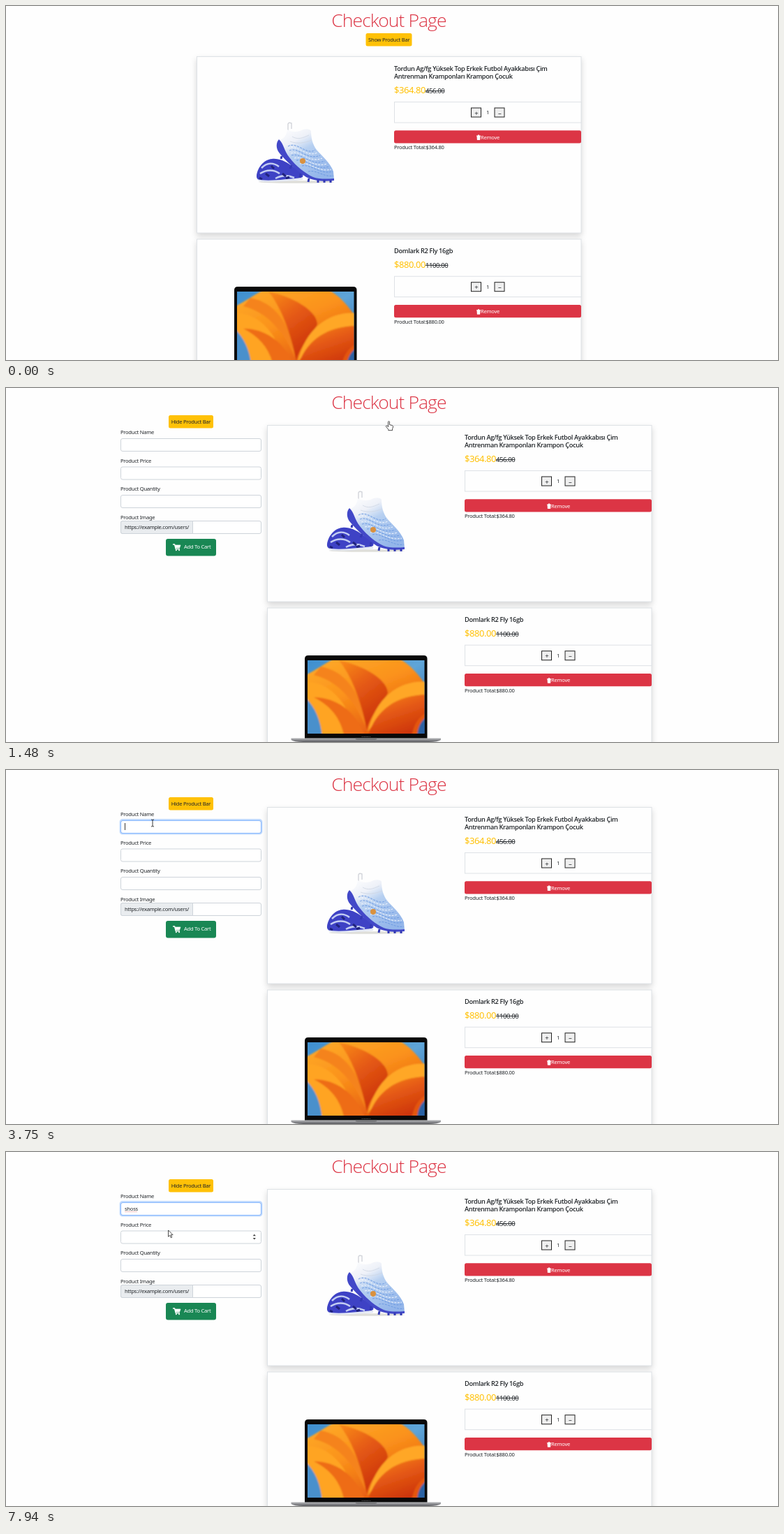
These frames come from a looping animation (1106x507 px, 8000 ms). An HTML page:

```html
<!DOCTYPE html>
<html lang="en">
<head>
<meta charset="utf-8">
<title>Checkout Page</title>
<style>
  html, body { margin: 0; width: 100%; height: 100%; overflow: hidden; background: #fefefe; }
  svg { display: block; width: 100vw; height: 100vh; }
  text { font: 7.6px "Noto Sans", "Open Sans", sans-serif; letter-spacing: -.035em; fill: #212529; white-space: pre; }
  .title { font: 300 26.5px "Open Sans", "Lato", sans-serif; fill: #dc3545; }
  .name { font: 600 9.2px "Open Sans", "Noto Sans", sans-serif; }
  .price { font-size: 13px; fill: #ffc107; }
  .old { font-size: 9.6px; fill: #212529; text-decoration: line-through; }
  .mid { text-anchor: middle; }
  .light { fill: #fff; }
  .sign { font-size: 9.5px; }
  .line { fill: #fefefe; stroke: #dee2e6; }
  .input { fill: #fff; stroke: #ced4da; }
  .card { fill: #fefefe; stroke: #dee2e6; filter: drop-shadow(0 4px 4px rgba(0, 0, 0, .16)); }
  .pointer { fill: #fff; stroke: #222; stroke-width: .8; stroke-linejoin: round; }
</style>
</head>
<body>
<svg id="stage" viewBox="0 0 1106 507">
  <defs>
    <linearGradient id="sky" x2="1" y2="1">
      <stop stop-color="#3f8fcf"/><stop offset=".5" stop-color="#5fa5d8"/><stop offset="1" stop-color="#2a62a4"/>
    </linearGradient>
    <linearGradient id="petal" x2=".6" y2="1">
      <stop stop-color="#ffb02c"/><stop offset=".5" stop-color="#fb921b"/><stop offset="1" stop-color="#e4560f"/>
    </linearGradient>
    <linearGradient id="ember" x2=".5" y2="1">
      <stop stop-color="#fa8c1b"/><stop offset=".45" stop-color="#e65c14"/><stop offset="1" stop-color="#cc330c"/>
    </linearGradient>
    <linearGradient id="knit" x2=".6" y2="1">
      <stop stop-color="#fff"/><stop offset=".3" stop-color="#eef1f8"/><stop offset=".5" stop-color="#b7d0f1"/><stop offset="1" stop-color="#94b6ea"/>
    </linearGradient>
    <linearGradient id="metal" x2="0" y2="1">
      <stop stop-color="#b9babd"/><stop offset=".5" stop-color="#8b8c90"/><stop offset="1" stop-color="#55565a"/>
    </linearGradient>
    <filter id="soft"><feGaussianBlur stdDeviation="1.2"/></filter>
    <clipPath id="screen"><rect x="331" y="409" width="167.5" height="105"/></clipPath>
  </defs>

  <text class="title mid" x="548.5" y="29.5">Checkout Page</text>

  <g id="open">
    <rect x="515.5" y="39" width="66" height="18.5" rx="2.5" fill="#ffc107"/>
    <text class="mid" x="548.7" y="51.2">Show Product Bar</text>
  </g>

  <g id="panel">
    <rect x="233" y="39" width="64" height="18.5" rx="2.5" fill="#ffc107"/>
    <text class="mid" x="265" y="51.2">Hide Product Bar</text>
    <g id="fields"></g>
    <path d="M164.5 193a2.5 2.5 0 0 1 2.5-2.5H267.5V208.5H167a2.5 2.5 0 0 1-2.5-2.5Z" fill="#e9ecef" stroke="#ced4da"/>
    <text x="170" y="202.3">https://example.com/users/</text>
    <rect x="229" y="216" width="72" height="24.5" rx="3" fill="#198754"/>
    <g fill="none" stroke="#fff" stroke-width="1.3">
      <path d="M239 224H241.5L243.2 230.5H249"/>
      <path d="M242 225H250L248.7 229H243Z" fill="#fff" stroke-width=".6"/>
      <path d="M243.8 232.3h.1M248 232.3h.1" stroke-width="2" stroke-linecap="round"/>
    </g>
    <text class="light" x="255" y="230.3">Add To Cart</text>
    <rect id="ring" x="163.5" y="71" width="203" height="20.5" rx="3.5" fill="none" stroke="#c2dbfe" stroke-width="2"/>
    <rect id="focus" x="164.5" y="72.5" width="201" height="18" rx="2.5" fill="none" stroke="#86b7fe"/>
    <text id="typed" x="170" y="84.3"></text>
    <path id="misspelt" d="M170.5 85.6H188.5" stroke="#e05252" stroke-width=".7" stroke-dasharray="1 1"/>
    <path id="caret" d="M0 76V86" stroke="#222" stroke-width=".9"/>
    <path id="spinner" d="M353.7 120.2L355.8 117.8L357.9 120.2ZM353.7 123L355.8 125.4L357.9 123Z" fill="#444"/>
  </g>

  <g id="cards">
    <rect class="card" x="273.5" y="72.5" width="550.5" height="252.5"/>
    <rect class="card" x="273.5" y="334" width="550.5" height="252.5"/>
    <g id="details"></g>

    <g id="boots">
      <ellipse cx="416" cy="252" rx="54" ry="1.8" fill="#deded9"/>
      <path d="M359 243C360 233 368 220 381 219C390 218 400 222 408 228L426 240L425 245C412 250 395 250 380 251C367 252 358 250 359 243Z" fill="#3e42c5"/>
      <path d="M366 232C374 224 383 224 391 230M364 240C373 234 384 234 392 240M386 247C395 242 404 242 413 246" fill="none" stroke="#c3cdf2" stroke-width="2.5"/>
      <path d="M363 246l4 2M372 240l5 4M380 229l4 4M396 240l5 4M401 247l5-2" stroke="#20237d" stroke-width="3"/>
      <path d="M359 248C374 252 400 248 425 246V249C400 251 374 253 363 251Z" fill="#e4e9f5"/>
      <path d="M404 178V169Q405 166 409 168V176" fill="none" stroke="#d2d4da" stroke-width="1.4"/>
      <path d="M403 177C408 180 414 181 421 179C429 175 435 176 437 179C437 189 439 198 445 206C452 214 465 225 469 237L470 249C460 251 447 249 437 245C421 236 409 221 396 211C389 205 387 197 392 192C399 190 402 184 403 177Z" fill="url(#knit)"/>
      <path d="M391 191C398 197 398 207 406 217C416 230 429 240 440 245C447 248 460 248 470 247V250C455 252 440 250 430 245C414 234 403 224 392 211C386 204 387 195 391 191Z" fill="#4248c8"/>
      <g fill="none" stroke="#6c9ae2" stroke-dasharray="3 1.5">
        <path d="M404 201C417 193 431 215 443 206M406 207C420 201 430 222 450 214M409 214C423 209 434 230 457 222M416 221C430 218 441 236 463 230M424 229C437 226 449 242 468 237M433 237C445 234 456 246 469 243"/>
        <path d="M404 204C417 197 431 218 446 210M408 211C422 205 433 226 453 218M413 218C428 213 439 233 460 226M421 226C435 222 447 239 466 234" stroke="#f3f7fd"/>
      </g>
      <path d="M410 187C418 192 425 189 434 185M407 194C418 198 428 196 438 192" fill="none" stroke="#cfd6e3" stroke-width=".8"/>
      <path d="M395 215l-1 4M409 228l-2 5M422 240l-1 6M434 247l-1 5M447 249v4M456 249v4M465 249v4" stroke="#3339b3" stroke-width="3"/>
      <circle cx="425" cy="222" r="4" fill="#d9913f"/>
    </g>

    <g id="laptop">
      <path d="M327 522V407Q327 402 332 402H497.5Q502.5 402 502.5 407V522Z" fill="#090909"/>
      <g clip-path="url(#screen)">
        <path d="M331 409H499V514H331Z" fill="url(#sky)"/>
        <g filter="url(#soft)">
          <path d="M325 432C345 422 362 409 382 400H446C474 408 490 428 505 452V520H325Z" fill="url(#petal)"/>
          <path d="M325 440C358 438 388 462 402 520H342Z" fill="#ffa424"/>
          <path d="M350 418C384 424 408 454 414 504C396 462 372 438 340 430Z" fill="#f5831a"/>
          <path d="M376 409C410 416 446 436 446 456C436 476 420 488 416 508C408 470 396 434 376 409Z" fill="url(#ember)"/>
          <path d="M505 440C466 436 430 458 417 512C432 488 462 472 505 472Z" fill="#ffa728"/>
          <path d="M505 458C458 458 428 480 417 520H480C482 500 492 488 505 482Z" fill="url(#ember)"/>
          <path d="M340 462C374 462 402 484 414 520H384C379 492 364 474 340 462Z" fill="#ee6c16"/>
          <path d="M325 460C343 476 350 496 352 520H325Z" fill="#4a90cc"/>
          <path d="M488 520C488 504 494 494 505 488V520Z" fill="#2a62a4"/>
        </g>
      </g>
      <text class="mid" x="415" y="519.3" style="font-size:2.5px;fill:#999">Domlark Fly</text>
      <path d="M307.5 520.5H522V523Q518 526 505 526H325Q311 526 307.5 523Z" fill="url(#metal)"/>
      <path d="M399 520.5H431Q430 523 427 523H403Q400 523 399 520.5Z" fill="#77787b"/>
    </g>
  </g>

  <circle id="click" r="9" fill="#ffe600" opacity=".65"/>
  <g id="pointers">
    <path class="pointer" id="arrow" d="M0 0V9.3L2.2 7.3L3.8 10.8L5.3 10.1L3.7 6.7H6.6Z"/>
    <path class="pointer" id="hand" d="M-1 1C-1 -.4 1 -.4 1 1V5L4.8 5.8Q6.3 6.3 6 8.3L5 11V13H-.7V11.6L-4 7.7C-4.7 6.2 -3 5.7 -2.2 6.7L-1 8Z"/>
    <path id="beam" d="M-2 -5Q0 -5 0 -4Q0 -5 2 -5M0 -4V4M-2 5Q0 5 0 4Q0 5 2 5" fill="none" stroke="#222" stroke-width=".9"/>
  </g>
</svg>
<script>
const LOOP = 8000, OPENED = 1480, CLICKED = 2830;
const el = id => document.getElementById(id);
const show = (id, on) => el(id).setAttribute("visibility", on ? "inherit" : "hidden");
const move = (id, x, y) => el(id).setAttribute("transform", `translate(${x} ${y})`);
const between = (t, from, to) => t >= from && t < to;

const stepButton = (x, y, sign) =>
  `<rect x="${x}" y="${y}" width="14" height="13" fill="#efefef" stroke="#222"/>
   <text class="sign mid" x="${x + 7.2}" y="${y + 10.5}">${sign}</text>`;

// y is the top of the quantity box
const product = (y, names, price, old) => `
  ${names.map((name, i) => `<text class="name" x="556" y="${y - 33.5 + 11.3 * (i + 1 - names.length)}">${name}</text>`).join("")}
  <text class="price" x="556" y="${y - 12.5}">$${price}<tspan class="old">${old}</tspan></text>
  <rect class="line" x="556.5" y="${y}" width="267.5" height="29.5"/>
  ${stepButton(666.5, y + 8.5, "+")}${stepButton(700, y + 8.5, "–")}
  <text class="mid" x="690" y="${y + 17.3}">1</text>
  <rect x="556" y="${y + 40.7}" width="268" height="18.3" rx="2.5" fill="#dc3545"/>
  <path d="M674 ${y + 48}h6v1h-.5l-.4 5.5h-4.2l-.4-5.5h-.5zM676 ${y + 47}h2v1h-2z" fill="#fff"/>
  <text class="light" x="680" y="${y + 53}">Remove</text>
  <text x="556" y="${y + 67.8}">Product Total:$${price}</text>`;

el("details").innerHTML =
  product(137.5, ["Tordun Ag/fg Yüksek Top Erkek Futbol Ayakkabısı Çim", "Antrenman Kramponları Krampon Çocuk"], "364.80", "456.00") +
  product(387.2, ["Domlark R2 Fly 16gb"], "880.00", "1100.00");

el("fields").innerHTML = ["Name", "Price", "Quantity", "Image"].map((label, i) => {
  const y = 66.2 + 40.5 * i;
  return `<text x="164" y="${y}">Product ${label}</text>
    <rect class="input" x="164.5" y="${i < 3 ? y + 6.3 : 190.5}" width="201" height="18" rx="2.5"/>`;
}).join("");

// time, x, y, pointer shape
const path = [
  [110, 1051, 472, "arrow"], [300, 930, 370, "arrow"], [520, 720, 190, "arrow"],
  [720, 585, 72, "arrow"], [800, 556, 50, "hand"], [860, 551, 40, "hand"],
  [930, 549, 33, "arrow"], [1060, 548, 40, "hand"], [1260, 548.5, 47.7, "hand"],
  [1810, 548.5, 47.7, "arrow"], [2000, 410, 85, "arrow"], [2180, 235, 142, "arrow"],
  [2320, 154, 128, "arrow"], [2430, 186, 97, "arrow"], [2480, 204, 84, "beam"],
  [2560, 205, 82, "beam"], [2700, 210, 76, "beam"], [7280, 210, 76, "beam"],
  [7420, 216, 97, "arrow"], [7480, 220, 114, "beam"], [7560, 225, 132, "arrow"],
  [7680, 230, 144, "arrow"], [7800, 233, 131, "arrow"], [7920, 232.5, 112, "arrow"]
];
const keys = [[5230, "s"], [5620, "h"], [5750, "o"], [6080, "s"], [6220, "s"]];
const caretOn = [[2900, 3220], [3750, 4280], [4750, 6750], [7280, 7810]];

function pointerAt(t) {
  const i = Math.max(0, path.findLastIndex(p => p[0] <= t));
  const a = path[i], b = path[i + 1] || a;
  const k = b === a ? 0 : Math.max(0, (t - a[0]) / (b[0] - a[0]));
  return { x: a[1] + (b[1] - a[1]) * k, y: a[2] + (b[2] - a[2]) * k, shape: a[3] };
}

function draw(t) {
  const opened = t >= OPENED;
  show("open", !opened);
  show("panel", opened);
  move("cards", opened ? 101 : 0, opened ? -19 : 0);

  const focus = Math.min(1, Math.max(0, (t - CLICKED) / 150));
  el("ring").setAttribute("opacity", focus);
  el("focus").setAttribute("opacity", focus);

  const typed = el("typed");
  typed.textContent = keys.filter(k => k[0] <= t).map(k => k[1]).join("");
  const width = typed.textContent ? typed.getComputedTextLength() : 0;
  move("caret", 170.5 + width, 0);
  show("caret", caretOn.some(([from, to]) => between(t, from, to)));
  show("misspelt", t >= 7420);

  const { x, y, shape } = pointerAt(t);
  show("spinner", between(t, 7470, 7560) || t >= 7810);
  show("pointers", t >= 110);
  move("pointers", x, y);
  for (const id of ["arrow", "hand", "beam"]) show(id, id === shape);
  show("click", between(t, 1400, OPENED) || between(t, CLICKED, 2960));
  move("click", x, y);
}

const start = performance.now();
function tick() {
  draw((performance.now() - start) % LOOP);
  requestAnimationFrame(tick);
}
tick();
</script>
</body>
</html>
```
